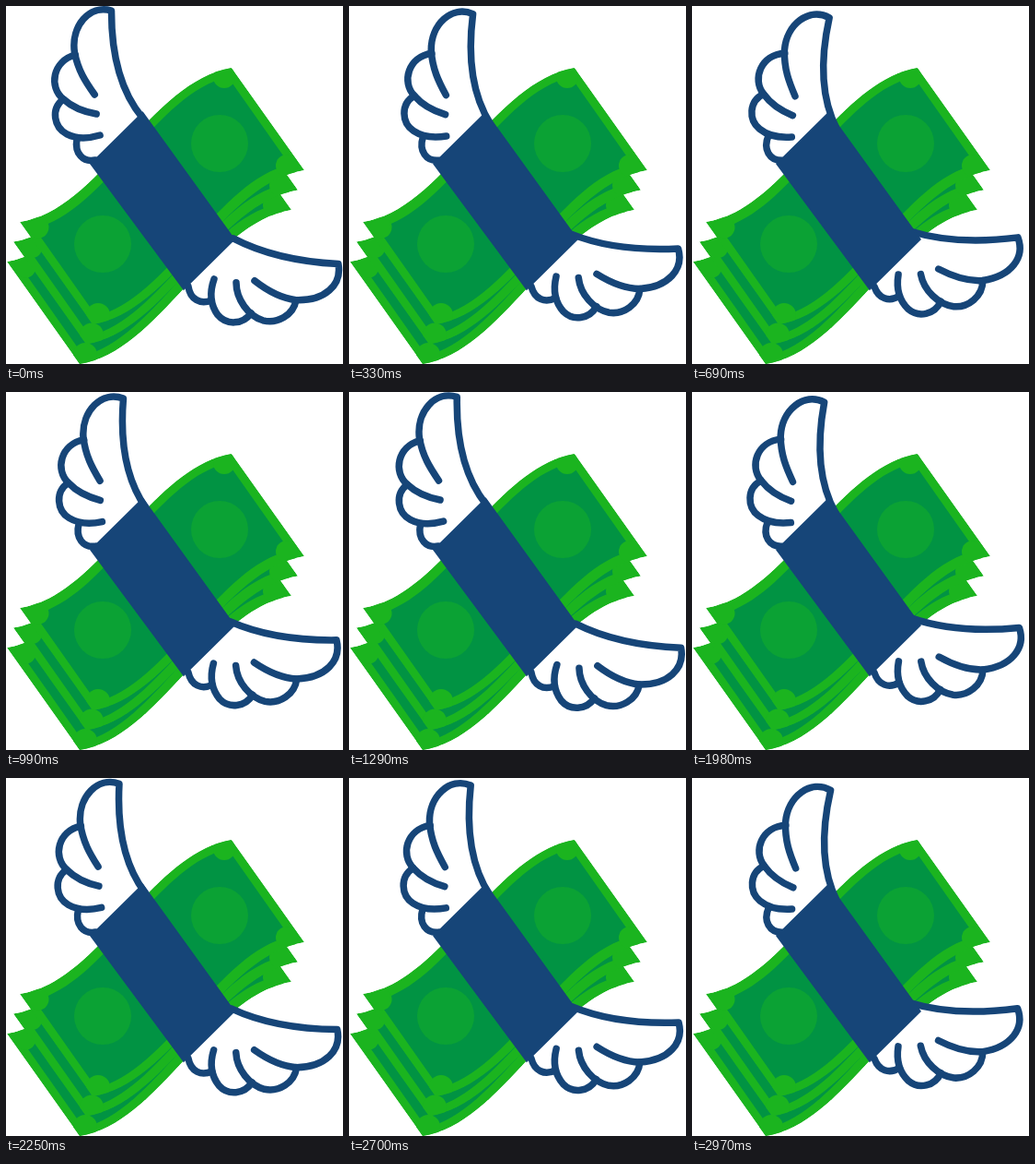
Animation of 366 by 388 pixels, one loop 3000 ms. Source, as an HTML page:

```html
<!DOCTYPE html>
<html>
<head>
<meta charset="utf-8">
<style>
  html, body { margin: 0; width: 100%; height: 100%; overflow: hidden; background: #fff; }
  svg { display: block; }
  .wing { fill: none; stroke: #164578; stroke-width: 7.5; stroke-linecap: round; stroke-linejoin: round; }
  .skin { fill: #fff; stroke: none; }
</style>
</head>
<body>
<svg width="366" height="388" viewBox="0 0 366 388">
  <defs>
    <path id="sheet" d="M15 234C101 222 157 81 245 67L324 178C236 192 180 333 94 345Z"/>
    <clipPath id="edge"><use href="#sheet"/></clipPath>
    <g id="bill" clip-path="url(#edge)">
      <use href="#sheet" fill="#1bb41f"/>
      <path fill="#019343" d="M31 241C109 222 163 94 241 77L308 172C230 189 176 317 98 336Z"/>
      <g fill="#1bb41f">
        <circle cx="35" cy="240" r="11.5"/>
        <circle cx="237" cy="77" r="12"/>
        <circle cx="305" cy="173" r="12"/>
        <circle cx="100" cy="335" r="13"/>
      </g>
    </g>
  </defs>

  <use href="#bill" x="-14" y="43"/>
  <use href="#bill" x="-7" y="21.5"/>
  <use href="#bill"/>
  <g fill="#0ba234">
    <circle cx="232" cy="149" r="31"/>
    <circle cx="105" cy="258" r="31"/>
  </g>

  <g id="left" class="wing">
    <path class="skin" d="M148 121C122 90 114 45 114 5C90 -2 70 22 74 50C50 60 46 88 62 101C48 112 52 132 66 139L77 144C74 160 84 170 97 167Z"/>
    <path d="M148 121C122 90 114 45 114 5C90 -2 70 22 74 50C78 70 86 82 96 96"/>
    <path d="M75 53C50 60 46 88 62 101C72 110 86 115 98 117"/>
    <path d="M62 101C48 112 52 132 66 139C78 145 92 143 102 140"/>
    <path d="M77 144C74 160 84 170 97 167"/>
  </g>

  <g id="right" class="wing">
    <path class="skin" d="M247 252C285 272 325 278 361 280C365 303 346 320 315 319C312 336 294 345 279 341L266 333C257 346 239 346 230 335L223 319C211 324 200 318 198 304Z"/>
    <path d="M247 252C285 272 325 278 361 280C365 303 346 320 315 319C298 317 284 309 270 298"/>
    <path d="M315 319C312 336 294 345 279 341C263 336 250 318 250 300"/>
    <path d="M266 333C257 346 239 346 230 335C222 324 221 310 226 296"/>
    <path d="M223 319C211 324 200 318 198 304"/>
  </g>

  <path fill="#164578" stroke="#164578" stroke-width="1.5" d="M92 171L148.5 115.5L248 253L193 307Z"/>
</svg>
<script>
  const LOOP = 3000, STEP = 30, STROKE = 600, LAG = 15;
  const left = document.getElementById('left');
  const right = document.getElementById('right');
  const ease = u => u * (0.5 + u * (1.5 - u));
  const turn = (wing, angle, x, y) => wing.setAttribute('transform', `rotate(${angle} ${x} ${y})`);

  // Each wing swings in and out every two strokes; the loop ends folded in and snaps open.
  function draw(now) {
    const time = Math.floor(now % LOOP / STEP) * STEP;
    const beat = Math.abs(time - LAG) / STROKE % 2;
    const fold = ease(beat < 1 ? beat : 2 - beat);
    turn(left, 13.6 * fold, 96, 170);
    turn(right, -11.4 * fold, 198, 304);
  }

  const start = performance.now();
  function tick() {
    draw(performance.now() - start);
    requestAnimationFrame(tick);
  }
  tick();
</script>
</body>
</html>
```
